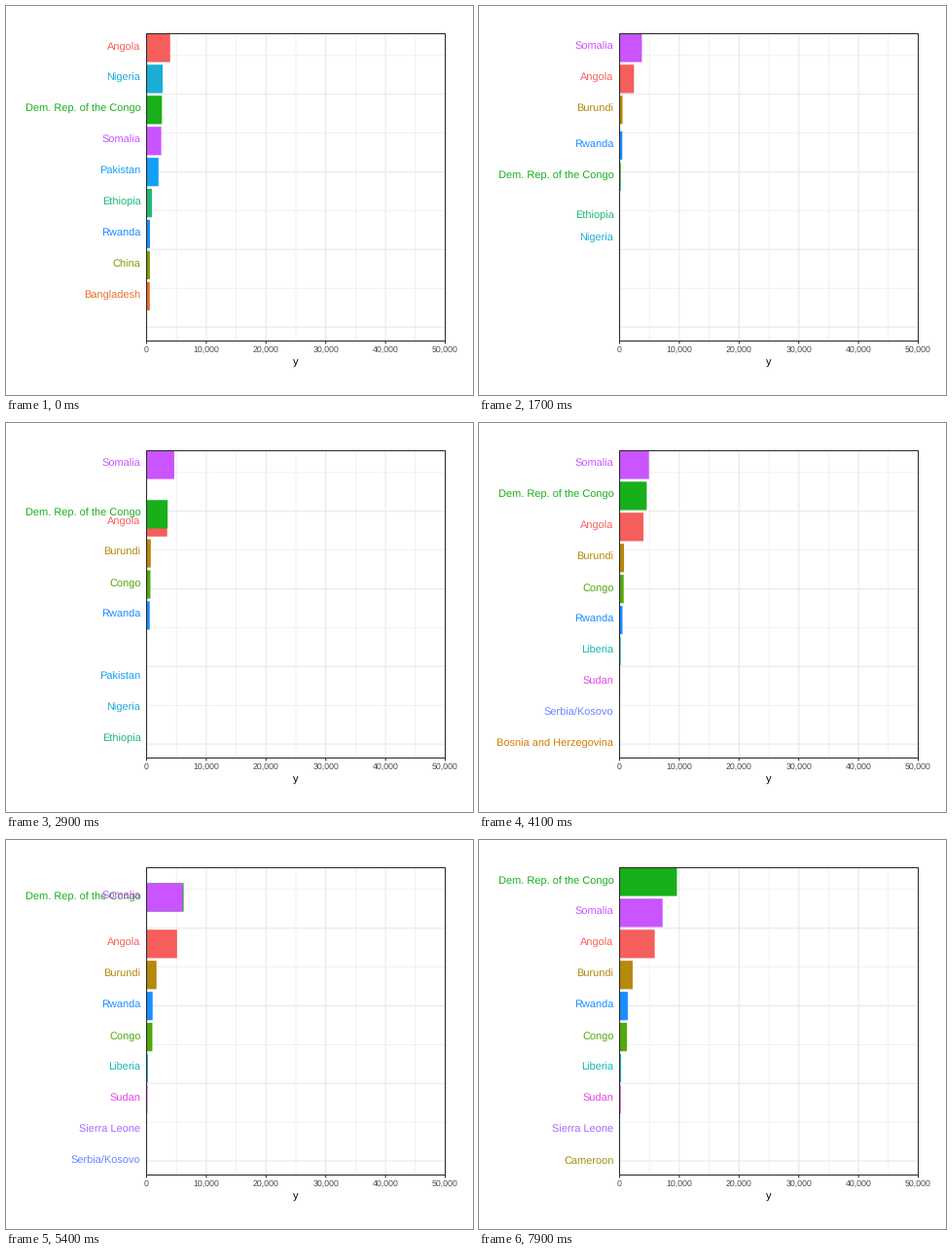
Recreate the animation shown at these times as a matplotlib script. Size 480 by 400 pixels, loop 8 s.

```python
import matplotlib.pyplot as plt
from matplotlib.animation import FuncAnimation
from matplotlib.patches import Rectangle

plt.rcParams["font.family"] = "Liberation Sans"
plt.rcParams["text.hinting"] = "none"

W, H, DPI = 480, 400, 100
STEP, FRAMES = 100, 80
PT = 72 / DPI
LEFT, RIGHT, TOP, BOTTOM = 144.5, 451.5, 28.5, 344.5
PITCH = (BOTTOM - TOP) / 9.9
BAR_H = 0.9 * PITCH
MAX = 50000

DRC = "Dem. Rep. of the Congo"
BOSNIA = "Bosnia and Herzegovina"
SERBIA = "Serbia/Kosovo"
SIERRA = "Sierra Leone"

# Alphabetical order is also the stacking order.
COLORS = {
    "Angola": "#f65e5b", "Bangladesh": "#e86e2b", BOSNIA: "#d17d08",
    "Burundi": "#b5890c", "Cameroon": "#9b930c", "China": "#7d9d0a",
    "Congo": "#52a80c", DRC: "#17b01a", "Ethiopia": "#1fb775",
    "Liberia": "#14b4b8", "Nigeria": "#1aaed6", "Pakistan": "#139ff5",
    "Rwanda": "#1a8dff", SERBIA: "#6a84ff", SIERRA: "#a468ff",
    "Somalia": "#ca54ff", "Sudan": "#e545e6",
}

# Each state lists countries from the top rank down.
STATES = [
    {"Angola": 3950, "Nigeria": 2690, DRC: 2570, "Somalia": 2460,
     "Pakistan": 2000, "Ethiopia": 890, "Rwanda": 570, "China": 560,
     "Bangladesh": 540},
    {"Somalia": 3690, "Angola": 2380, "Burundi": 470, "Rwanda": 440,
     DRC: 190, "Ethiopia": 20, "Nigeria": 10},
    {"Somalia": 3980, "Angola": 2570, "Burundi": 690, "Congo": 610,
     "Rwanda": 540, DRC: 190, "Pakistan": 20, "Nigeria": 15, "Ethiopia": 10},
    {"Somalia": 4740, DRC: 4100, "Angola": 3600, "Burundi": 710,
     "Congo": 650, "Rwanda": 520, "Liberia": 150, "Pakistan": 20,
     "Nigeria": 15, "Ethiopia": 10},
    {"Somalia": 4920, DRC: 4540, "Angola": 4000, "Burundi": 740,
     "Congo": 690, "Rwanda": 490, "Liberia": 180, "Sudan": 90,
     SERBIA: 20, BOSNIA: 10},
    {"Somalia": 5530, DRC: 5350, "Angola": 4850, "Burundi": 1540,
     "Rwanda": 950, "Congo": 930, "Liberia": 200, "Sudan": 130,
     SIERRA: 30, SERBIA: 20},
    {DRC: 7060, "Somalia": 6550, "Angola": 5350, "Burundi": 1780,
     "Rwanda": 1070, "Congo": 1000, "Liberia": 230, "Sudan": 160,
     SIERRA: 40, SERBIA: 20},
    {DRC: 8900, "Somalia": 6900, "Angola": 5650, "Burundi": 2000,
     "Rwanda": 1220, "Congo": 1120, "Liberia": 240, "Sudan": 180,
     SIERRA: 50, "Cameroon": 30},
    {DRC: 9600, "Somalia": 7200, "Angola": 5880, "Burundi": 2190,
     "Rwanda": 1370, "Congo": 1220, "Liberia": 250, "Sudan": 200,
     SIERRA: 60, "Cameroon": 40},
]

# (start, end) step of the move from each state to the next
MOVES = [(0, 9), (14, 23), (23, 32), (32, 41), (41, 50), (50, 58),
         (58, 67), (67, 76)]


def x_at(value):
    return LEFT + (RIGHT - LEFT) * value / MAX


def y_at(rank):
    return TOP + (rank - 0.55) * PITCH


def ease(t):
    return 4 * t ** 3 if t < 0.5 else 1 - 4 * (1 - t) ** 3


def placed(state):
    return {name: (rank, value)
            for rank, (name, value) in enumerate(state.items(), 1)}


LAYOUTS = [placed(s) for s in STATES]


def layout(i):
    """Rank and value of every visible country at step i."""
    for k, (start, end) in enumerate(MOVES):
        if i <= start:
            return LAYOUTS[k]
        if i < end:
            a, b = LAYOUTS[k], LAYOUTS[k + 1]
            t = ease((i - start) / (end - start))
            return {n: tuple(p + (q - p) * t for p, q in zip(a[n], b[n]))
                    for n in a if n in b}
    return LAYOUTS[-1]


fig = plt.figure(figsize=(W / DPI, H / DPI), dpi=DPI, facecolor="white")
ax = fig.add_axes([0, 0, 1, 1])
ax.set_xlim(0, W)
ax.set_ylim(H, 0)
ax.axis("off")


def line(xs, ys, color, width, z):
    ax.plot(xs, ys, color=color, lw=width * PT, zorder=z,
            solid_capstyle="butt", snap=False)


def label(x, y, text, size, color, ha):
    return ax.text(x, y, text, fontsize=size * PT, color=color, ha=ha,
                   va="baseline", zorder=6)


for j in range(1, 10):
    major = j % 2 == 0
    x = x_at(j * 5000)
    line([x, x], [TOP, BOTTOM], "#e8e8e8", 1.07 if major else 0.6, major)
for j in range(8):
    major = j % 2 == 1
    y = y_at(1.25 * (j + 1))
    line([LEFT, RIGHT], [y, y], "#e8e8e8", 1.07 if major else 0.6, major)

ax.add_patch(Rectangle((LEFT, TOP), RIGHT - LEFT, BOTTOM - TOP, fill=False,
                       ec="#2b2b2b", lw=1.07 * PT, zorder=5, snap=False))
for v in range(0, MAX + 1, 10000):
    x = x_at(v)
    line([x, x], [BOTTOM, BOTTOM + 2.9], "#2b2b2b", 1.07, 5)
    label(x, 356, f"{v:,}", 8.8, "#484848", "center")
label(298, 370, "y", 11, "black", "center")

bars, tags = {}, {}
for n, color in COLORS.items():
    bars[n] = ax.add_patch(Rectangle((LEFT, 0), 0, BAR_H + 0.5, fc=color,
                                     lw=0, zorder=3, snap=False))
    bars[n].set_clip_path(Rectangle((LEFT, TOP), RIGHT - LEFT, BOTTOM - TOP,
                                    transform=ax.transData))
    tags[n] = label(138.4, 0, n, 11.05, color, "right")


def draw(i):
    now = layout(i)
    for n in COLORS:
        shown = n in now
        bars[n].set_visible(shown)
        tags[n].set_visible(shown)
        if shown:
            rank, value = now[n]
            y = y_at(rank)
            bars[n].set_y(y - BAR_H / 2 - 0.1)
            bars[n].set_width(x_at(value) - LEFT)
            tags[n].set_y(y + 2.4)
    return [*bars.values(), *tags.values()]


anim = FuncAnimation(fig, draw, frames=FRAMES, interval=STEP, repeat=True,
                     repeat_delay=0, blit=False)
plt.show()
```
